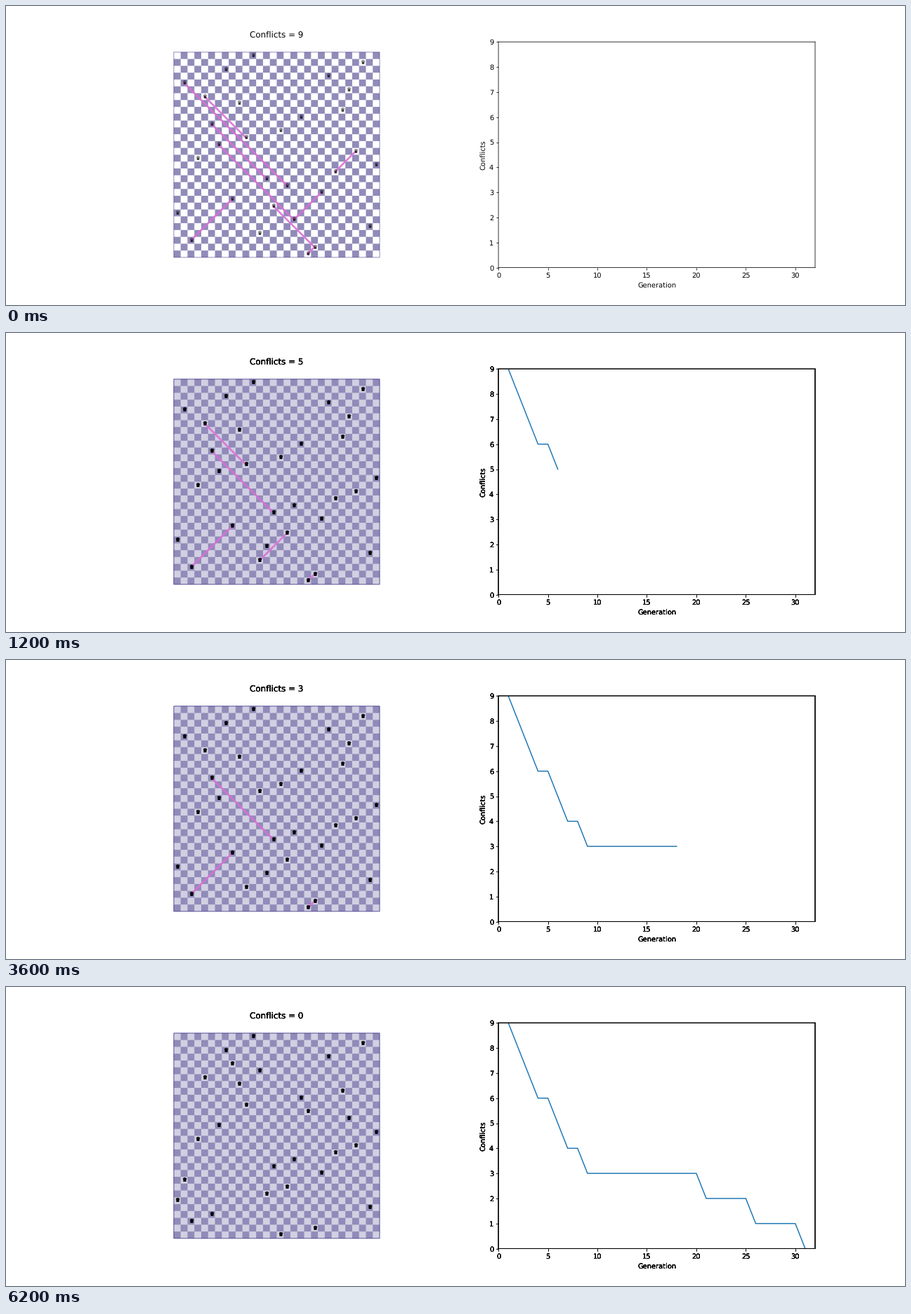
These frames come from a looping animation (1280 px wide and 427 px high, 6.4 s). A matplotlib script:

```python
from itertools import combinations

import matplotlib.pyplot as plt
import numpy as np
from matplotlib.animation import FuncAnimation
from matplotlib.collections import LineCollection, PolyCollection
from matplotlib.patches import Rectangle

N = 30
FRAMES = 32
DPI = 64
K = 10 / 9  # point scale: sizes are designed for 18 inches across 1280 px
PASSES = 4  # repeated drawing that darkens text and frame

plt.rcParams.update({
    "font.family": "DejaVu Sans",
    "font.size": 10 * K,
    "text.hinting": "none",
    "path.snap": False,
    "axes.linewidth": 0.8 * K,
    "axes.labelpad": 4 * K,
    "axes.titlepad": 6 * K,
    "lines.linewidth": 1.5 * K,
})
for side in ("xtick", "ytick"):
    plt.rcParams.update({
        f"{side}.major.size": 3.5 * K,
        f"{side}.major.width": 0.8 * K,
        f"{side}.major.pad": 3.5 * K,
    })

# Column of the queen in each row, top row first
START = [11, 27, 7, 22, 1, 25, 4, 9, 24, 18, 5, 15, 10, 6, 26,
         3, 29, 23, 13, 16, 21, 8, 14, 0, 17, 28, 12, 2, 20, 19]
START[4], START[5], START[6] = 1, 25, 4

# Best boards of the search: first generation, row swaps from START
EARLY = [(14, 16), (18, 24), (19, 22)]
MID = EARLY + [(12, 26)]
LATE = MID + [(4, 21), (11, 29)]
NEAR = LATE + [(5, 12), (10, 26)]
BEST = [
    (0, []),
    (2, EARLY[:1]),
    (3, EARLY[1:2]),
    (4, EARLY[:2]),
    (6, EARLY),
    (7, EARLY + [(2, 27)]),
    (9, EARLY + [(2, 27), (5, 29)]),
    (12, MID + [(5, 29)]),
    (15, MID),
    (19, MID + [(4, 21)]),
    (21, LATE),
    (25, LATE + [(5, 12)]),
    (26, NEAR),
    (31, NEAR + [(23, 24)]),
]


def board_at(gen):
    swaps = [s for first, s in BEST if first <= gen][-1]
    cols = list(START)
    for a, b in swaps:
        cols[a], cols[b] = cols[b], cols[a]
    return cols


def attacks(cols):
    """Pairs of cell centres that share a diagonal."""
    cells = [(c + 0.5, r + 0.5) for r, c in enumerate(cols)]
    return [(p, q) for p, q in combinations(cells, 2)
            if abs(p[0] - q[0]) == abs(p[1] - q[1])]


boards = [board_at(g) for g in range(FRAMES)]
segments = [attacks(b) for b in boards]
counts = [len(s) for s in segments]

fig = plt.figure(figsize=(1280 / DPI, 427 / DPI), dpi=DPI, facecolor="white")
fig.subplots_adjust(left=0.125, right=0.9, bottom=0.125, top=0.88, wspace=0.2)
grid = fig.add_gridspec(1, 2)


def add_panels():
    """Board axes with queens, and chart axes with frame and labels."""
    left = fig.add_subplot(grid[0], facecolor="none")
    left.set(xlim=(-1.5, N + 1.5), ylim=(N + 1.5, -1.5), aspect="equal")
    left.set_axis_off()
    queens = [left.text(0, r + 0.5, "\u265b", fontsize=8 * K, ha="center",
                        va="center", zorder=3) for r in range(N)]
    right = fig.add_subplot(grid[1], facecolor="none")
    right.set(xlim=(0, 32), ylim=(0, 9), xticks=range(0, 31, 5),
              yticks=range(10), xlabel="Generation", ylabel="Conflicts")
    return left, right, queens


panels = [add_panels() for _ in range(PASSES)]
board_ax, chart_ax, _ = panels[0]

INK = np.array([72, 61, 139]) / 255


def tint(alpha):
    return tuple(1 - alpha + alpha * INK)


def square(c, r):
    return [(c, r), (c + 1, r), (c + 1, r + 1), (c, r + 1)]


backing = board_ax.add_patch(Rectangle((0, 0), N, N, lw=0, zorder=0))
dark = [square(c, r) for r in range(N) for c in range(N) if (r + c) % 2]
board_ax.add_collection(
    PolyCollection(dark, facecolors=[tint(0.6)], linewidths=0, zorder=1),
    autolim=False)
edge = board_ax.add_patch(
    Rectangle((0, 0), N, N, fill=False, ec=INK, lw=K, zorder=1.5))
links = board_ax.add_collection(
    LineCollection([], colors=["orchid"], linewidths=2.7 * K, alpha=0.9,
                   capstyle="projecting", zorder=2),
    autolim=False)
curve, = chart_ax.plot([], [], color="#1f77b4")


def update(gen):
    later = gen > 0
    backing.set_facecolor(tint(0.25 if later else 0))
    edge.set_alpha(0.9 if later else 0.6)
    for i, (left, right, queens) in enumerate(panels):
        left.set_visible(later or i == 0)
        right.set_visible(later or i == 0)
        left.set_title(f"Conflicts = {counts[gen]}")
        for queen, col in zip(queens, boards[gen]):
            queen.set_x(col + 0.5)
    links.set_segments(segments[gen])
    curve.set_data(range(gen + 1), counts[:gen + 1])
    return []


anim = FuncAnimation(fig, update, frames=FRAMES, init_func=lambda: update(0),
                     interval=200, repeat=True, repeat_delay=0, blit=False)
plt.show()
```
